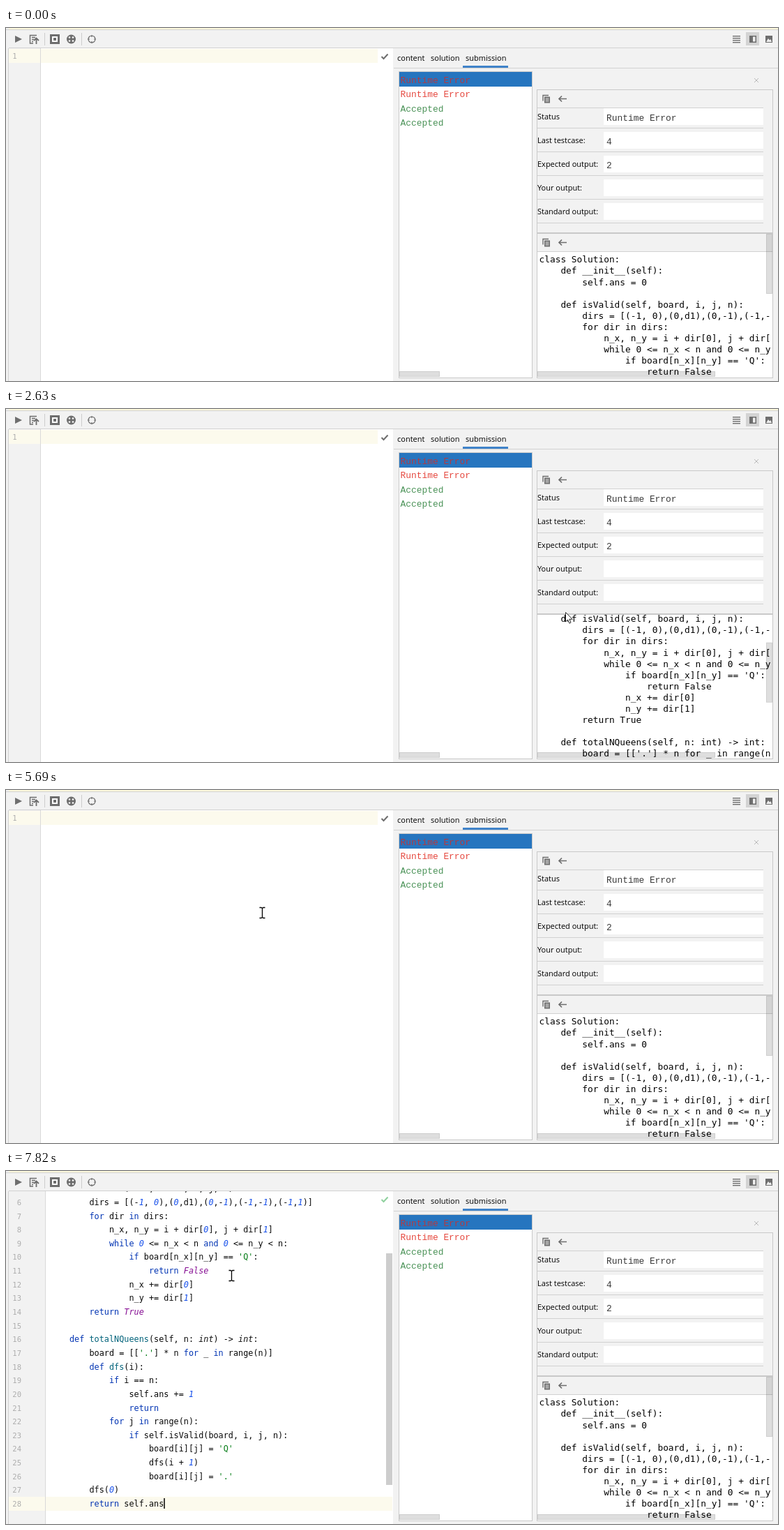
These frames come from a looping animation (1107x506 px, 8 s). An HTML page with a canvas:

```html
<!DOCTYPE html>
<html lang="en">
<head>
<meta charset="utf-8">
<title>Submission panel</title>
<style>
  html, body { margin: 0; width: 100%; height: 100%; overflow: hidden; background: #f2f2f2; }
  canvas { display: block; }
</style>
</head>
<body>
<canvas id="stage" width="1107" height="506"></canvas>
<script>
const ctx = document.getElementById('stage').getContext('2d');
const LOOP = 8000;
const UI = '11px "Open Sans", "Noto Sans CJK SC", sans-serif';
const COURIER = '12.9px "Liberation Mono", monospace';
const PANEL = '12.83px "DejaVu Sans Mono", monospace';
const EDITOR = '11.83px "DejaVu Sans Mono", monospace';
const BG = '#f2f2f2', EDGE = '#d1d1d1', ICON = '#6e6e6e', ROW = 19.64;

const code = `class Solution:
    def __init__(self):
        self.ans = 0

    def isValid(self, board, i, j, n):
        dirs = [(-1, 0),(0,d1),(0,-1),(-1,-1),(-1,1)]
        for dir in dirs:
            n_x, n_y = i + dir[0], j + dir[1]
            while 0 <= n_x < n and 0 <= n_y < n:
                if board[n_x][n_y] == 'Q':
                    return False
                n_x += dir[0]
                n_y += dir[1]
        return True

    def totalNQueens(self, n: int) -> int:
        board = [['.'] * n for _ in range(n)]
        def dfs(i):
            if i == n:
                self.ans += 1
                return
            for j in range(n):
                if self.isValid(board, i, j, n):
                    board[i][j] = 'Q'
                    dfs(i + 1)
                    board[i][j] = '.'
        dfs(0)
        return self.ans`.split('\n');

// [time, x, y]
const mouse = [
  [120, 1056, 458], [310, 990, 366], [510, 990, 366], [580, 990, 365], [1550, 990, 365],
  [1750, 990, 362], [2080, 990, 362], [2630, 802, 291], [2840, 812, 296], [3120, 869, 331],
  [3450, 869, 331], [3990, 782, 305], [4330, 782, 305], [4680, 549, 220], [5030, 552, 246],
  [5250, 552, 246], [5880, 316, 157], [5950, 316, 157], [6060, 329, 152], [6160, 323, 150]
];
// [start, end, change in scroll]
const wheel = [
  [700, 1100, 96], [1060, 1350, 96], [1500, 1750, 96.5],
  [2060, 2320, -96.5], [2310, 2600, -96.5], [2880, 3120, -95.5]
];
const DIALOG = [4260, 5150], HOVER_FROM = 3800, PASTE = 7490;

const progress = (t, a, b) => Math.min(1, Math.max(0, (t - a) / (b - a)));
const smooth = p => p * p * (3 - 2 * p);
const scrollAt = t => wheel.reduce((sum, [a, b, d]) => sum + d * smooth(progress(t, a, b)), 0);

function mouseAt(t) {
  const i = mouse.findIndex(p => p[0] > t);
  if (i < 0) return mouse[mouse.length - 1].slice(1);
  const [a, x0, y0] = mouse[i - 1], [b, x1, y1] = mouse[i];
  const k = smooth(progress(t, a, b));
  return [x0 + (x1 - x0) * k, y0 + (y1 - y0) * k];
}

function rect(x, y, w, h, color) {
  ctx.fillStyle = color;
  ctx.fillRect(x, y, w, h);
}
function frame(x, y, w, h, color) {
  ctx.strokeStyle = color;
  ctx.lineWidth = 1;
  ctx.strokeRect(x + .5, y + .5, w - 1, h - 1);
}
function text(str, x, y, font, color = '#000') {
  ctx.font = font;
  ctx.fillStyle = color;
  ctx.fillText(str, x, y);
}
function stroke(path, color, width) {
  ctx.strokeStyle = color;
  ctx.lineWidth = width;
  ctx.stroke(new Path2D(path));
}
function fill(path, color) {
  ctx.fillStyle = color;
  ctx.fill(new Path2D(path));
}
function disc(x, y, r, color) {
  ctx.beginPath();
  ctx.arc(x, y, r, 0, 7);
  ctx.fillStyle = color;
  ctx.fill();
}
function clipped(x, y, w, h, draw) {
  ctx.save();
  ctx.beginPath();
  ctx.rect(x, y, w, h);
  ctx.clip();
  draw();
  ctx.restore();
}
function scrollbar(x, y, w, h) {
  rect(x, y, w, h, 'rgba(0,0,0,.13)');
  frame(x, y, w, h, 'rgba(0,0,0,.07)');
}

function mainToolbar() {
  rect(0, 0, 1107, 29, BG);
  rect(4, 0, 1103, 2, '#fdf7dc');
  rect(0, 2, 1107, 1, EDGE);
  rect(4, 28, 1103, 1, EDGE);
  fill('M13 11L23 16L13 21Z', ICON);
  stroke('M44 10.5H34.5V22H39M37 13.5H42M37 16.5H40M37 19.5H39', ICON, 1.5);
  stroke('M43.5 23V15M40 18L43.5 14.5L47 18', ICON, 1.8);
  rect(55, 7, 1, 18, '#cdcdcd');
  rect(63, 9, 14, 14, ICON);
  rect(66, 12, 8, 8, '#fff');
  rect(68, 14, 4, 4, ICON);
  disc(93.5, 16, 6.5, ICON);
  for (const x of [91, 96]) for (const y of [13.5, 18.5]) disc(x, y, 1.3, '#fff');
  rect(108, 7, 1, 18, '#cdcdcd');
  stroke('M128 16A5 5 0 1 1 118 16A5 5 0 1 1 128 16M123 10V13M123 19V22M117 16H120M126 16H129', ICON, 1.2);
  for (let y = 11; y < 22; y += 3) rect(1042, y, 11, 1.4, ICON);
  rect(1061, 6, 19, 19, '#d3d3d3');
  rect(1066, 11, 10, 10, ICON);
  rect(1071, 12.5, 3.5, 7, '#eee');
  rect(1089, 11, 10, 10, ICON);
  fill('M1090 20L1093 15L1095 17.5L1096.5 16L1098 20Z', '#eee');
}

const token = /'[^']*'|\b(?:class|def|for|in|while|and|if|return)\b|\b(?:True|False|int)\b|\b\d+\b|(?<=def )\w+/g;
function tokenColor(word) {
  if (word[0] === "'") return '#067d17';
  if (/^\d/.test(word)) return '#1750eb';
  if (/^(True|False)$/.test(word)) return '#871094';
  if (word === 'int') return '#111';
  return /^(class|def|for|in|while|and|if|return)$/.test(word) ? '#0033b3' : '#00627a';
}
function highlighted(line, x, y) {
  ctx.font = EDITOR;
  const w = ctx.measureText('0').width;
  text(line.replace(token, m => ' '.repeat(m.length)), x, y, EDITOR, '#080808');
  for (const m of line.matchAll(token)) {
    const style = /^(\d+|True|False|int)$/.test(m[0]) ? 'italic ' : '';
    text(m[0], x + m.index * w, y, style + EDITOR, tokenColor(m[0]));
  }
  return x + line.length * w;
}

function editor(t) {
  const pasted = t >= PASTE;
  const lines = pasted ? code : [''];
  const k = pasted ? smooth(progress(t, PASTE - 60, PASTE + 200)) : 0;
  const gutter = pasted ? 57 : 50;
  const first = 44 - 93.3 * k;
  const caretY = first + (lines.length - 1) * ROW;
  rect(0, 29, 556, 477, BG);
  rect(gutter, 29, 555 - gutter, 477, '#fff');
  clipped(4, 29, 551, 477, () => {
    rect(4, Math.round(caretY - 14), 550, 20, '#fcfaed');
    rect(gutter - 1, 29, 1, 477, '#d9d9d9');
    ctx.textAlign = 'right';
    lines.forEach((_, i) => text(i + 1, pasted ? 22 : 15.5, first + i * ROW, '10.5px "DejaVu Sans Mono", monospace', '#adadad'));
    ctx.textAlign = 'left';
    let end = 0;
    lines.forEach((line, i) => end = highlighted(line, 62.5, first + i * ROW));
    if (pasted) {
      rect(end, caretY - 12, 1.5, 15, '#000');
      rect(545, 29 + 89 * k, 9, 332, '#cdcdcd');
    }
    rect(533, 29, 21, 22, '#fff');
  });
  rect(3, 0, 1, 506, EDGE);
  stroke('M538.5 41L541.5 44L547.5 37.5', t >= PASTE + 200 ? '#8fd19e' : ICON, 2);
}

function copyIcons(y, hover) {
  if (hover) rect(765, y - 10, 20, 20, '#dcdcdc');
  stroke(`M770 ${y + 3}V${y - 5}H778`, ICON, 1.4);
  rect(772, y - 3, 8, 9, ICON);
  for (const d of [-1, 1, 3]) rect(773.5, y + d, 5, 1, '#ddd');
  stroke(`M804 ${y}H793M797 ${y - 4}L793 ${y}L797 ${y + 4}`, ICON, 1.7);
}

function submissionPanel() {
  rect(555, 29, 552, 477, BG);
  text('content', 561, 46.5, UI);
  text('solution', 609, 46.5, UI);
  text('submission', 659, 46.5, UI);
  rect(556, 57, 551, 1, EDGE);
  rect(655, 54, 65, 3, '#4083c9');

  rect(564, 63, 190, 438, '#fff');
  frame(563, 62, 192, 440, '#c9c9c9');
  rect(564, 63, 190, 21, '#2675bf');
  ['Runtime Error', 'Runtime Error', 'Accepted', 'Accepted'].forEach((status, i) =>
    text(status, 565.5, 79 + i * 20.4, COURIER, i > 1 ? '#4a9257' : i ? '#e5483f' : '#b23a42'));
  scrollbar(564, 492, 58, 8);

  stroke('M1073 72L1079 78M1079 72L1073 78', '#b9b9b9', 1);
  frame(761, 88, 339, 414, '#c9c9c9');
  copyIcons(101.5);
  rect(762, 114, 324, 1, EDGE);
  const fields = [['Status', 'Runtime Error'], ['Last testcase:', '4'], ['Expected output:', '2'], ['Your output:', ''], ['Standard output:', '']];
  fields.forEach(([label, value], i) => {
    const y = 115 + i * 34;
    text(label, 762, y + 16, UI);
    rect(857, y, 229, 24, '#fff');
    text(value, 861, y + 17.5, COURIER, '#3a3a3a');
    rect(762, y + 28, 324, 1, EDGE);
  });
}

function codePanel(t) {
  const shift = scrollAt(t);
  rect(761, 293, 339, 2, '#c9c9c9');
  clipped(762, 295, 337, 206, () => {
    rect(762, 295, 337, 206, '#fff');
    rect(762, 294 - shift, 337, 26, BG);
    rect(762, 320 - shift, 337, 1, EDGE);
    copyIcons(307.5 - shift, t >= HOVER_FROM && t < DIALOG[1]);
  });
  clipped(762, 295, 335, 206, () =>
    code.forEach((line, i) => text(line, 764.5, 336.3 + i * 16.1 - shift, PANEL)));
  scrollbar(762, 492, 255, 8);
  scrollbar(1090, 295 + shift * 120 / 288.5, 9, 86);
}

function dialog() {
  ctx.save();
  ctx.shadowColor = 'rgba(0,0,0,.38)';
  ctx.shadowBlur = 12;
  ctx.shadowOffsetY = 2;
  rect(438, 167, 235, 107, BG);
  ctx.restore();
  rect(438, 167, 235, 28, '#fff');
  frame(438, 167, 235, 108, '#b5b5b5');
  text('消息', 445, 185, UI);
  stroke('M653 176.5L662 185.5M662 176.5L653 185.5', '#333', 1);
  const blend = ctx.createLinearGradient(451, 206, 473, 228);
  blend.addColorStop(0, '#2cb7c9');
  blend.addColorStop(1, '#3d7cf4');
  disc(462, 217, 13, blend);
  rect(460.5, 209, 3, 10, '#fff');
  rect(460.5, 221, 3, 3, '#fff');
  text('Copy Success', 490, 220, UI);
  ctx.beginPath();
  ctx.roundRect(522, 238, 68, 25, 4);
  ctx.fillStyle = '#97c3f3';
  ctx.fill();
  ctx.beginPath();
  ctx.roundRect(525, 241, 62, 19, 2);
  ctx.fillStyle = '#4d89c9';
  ctx.fill();
  text('确定', 545, 254.5, 'bold ' + UI, '#fff');
}

function pointer(t) {
  if (t < mouse[0][0]) return;
  const [x, y] = mouseAt(t);
  ctx.save();
  ctx.translate(Math.round(x), Math.round(y));
  if (t >= DIALOG[1] && x < 555) {
    stroke('M-3.5 -7.5H-1L.5 -6.5L2 -7.5H4.5M.5 -7V7M-3.5 7.5H-1L.5 6.5L2 7.5H4.5', '#000', 1.3);
  } else {
    const arrow = 'M.5 .5V14L3.6 11L5.8 16.2L8 15.2L5.9 10.3H10.3Z';
    fill(arrow, '#fff');
    stroke(arrow, '#333', 1);
  }
  ctx.restore();
}

function draw(now) {
  const t = now % LOOP;
  editor(t);
  submissionPanel();
  codePanel(t);
  mainToolbar();
  if (t >= DIALOG[0] && t < DIALOG[1]) dialog();
  pointer(t);
}

const start = performance.now();
(function tick() {
  draw(performance.now() - start);
  requestAnimationFrame(tick);
})();
</script>
</body>
</html>
```
